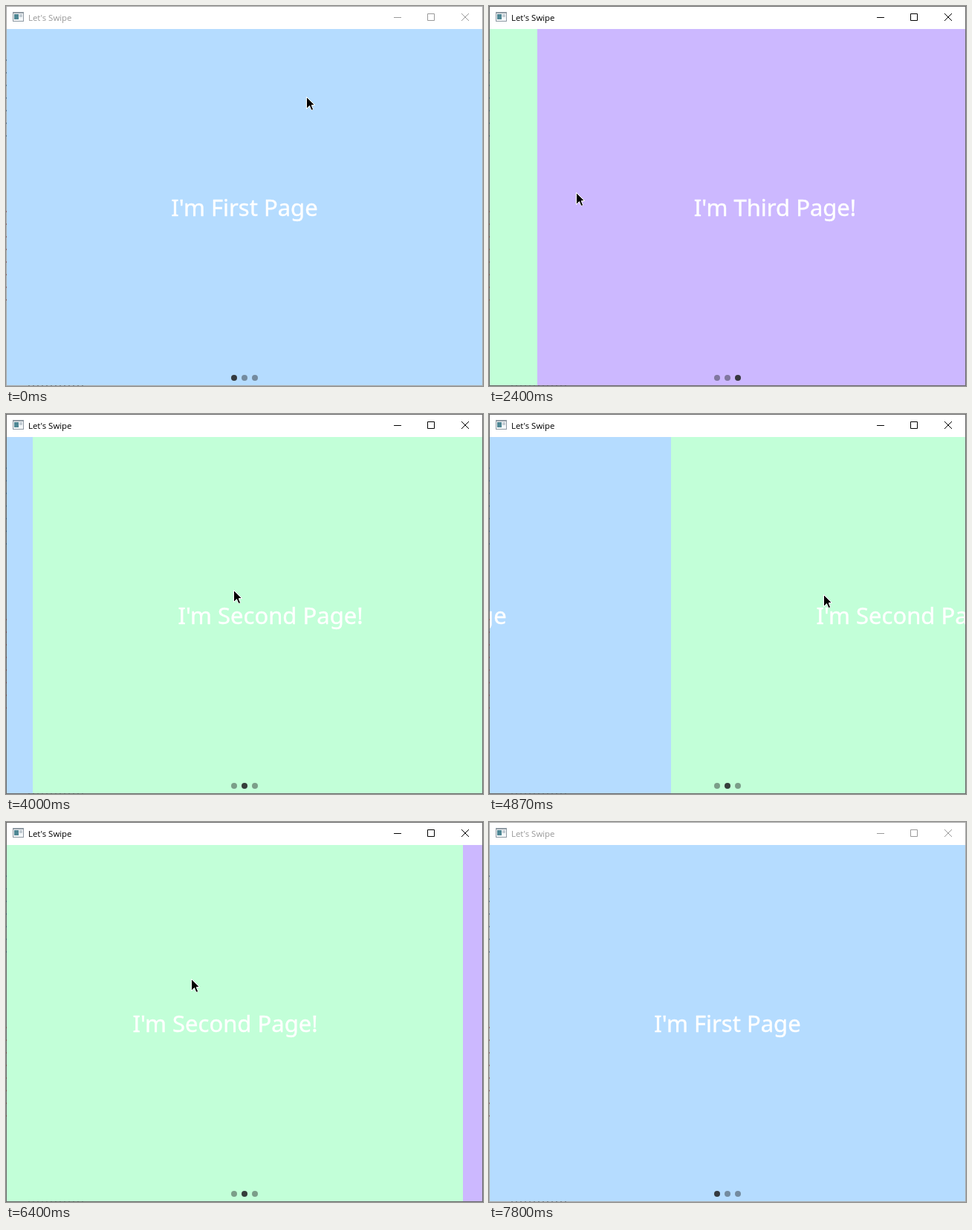
Write an HTML page with a canvas that moves like this. It is 642 px wide and 512 px high and loops after 7.94 s.

```html
<!DOCTYPE html>
<html lang="en">
<head>
<meta charset="utf-8">
<title>Let's Swipe</title>
<style>
html, body { margin: 0; width: 100%; height: 100%; overflow: hidden; background: #fff; }
canvas { display: block; }
</style>
</head>
<body>
<canvas id="stage" width="642" height="512"></canvas>
<script>
const ctx = document.getElementById('stage').getContext('2d');
const LOOP = 7940, TICK = 1000 / 15, PAGE = 640;
const ACTIVE_FROM = 12, ACTIVE_TO = 117;

const pages = [
  { text: "I'm First Page", color: '#b5dcff' },
  { text: "I'm Second Page!", color: '#c2ffd8' },
  { text: "I'm Third Page!", color: '#ccb8ff' },
];

// Ticks at which the swipes begin: two forward, two back, and again.
const swipeStarts = [12.63, 30.73, 48.5, 58.63, 69.05, 77, 90.23, 96.92];
const SWIPE_TICKS = 7;

// Pointer stops: arrival tick, x, y. It rests until the stroke to the next stop begins.
const stops = [
  [0, 404, 122], [2, 552, 201], [18, 33, 217], [23, 257, 229], [29, 463, 251],
  [36, 117, 251], [47, 138, 240], [54, 440, 236], [60, 306, 237], [65, 540, 236],
  [69, 600, 240], [73, 450, 243], [77, 610, 255], [84, 399, 265], [89, 191, 196],
  [96, 249, 211], [102, 570, 230], [108, 645, 300],
];
const STROKE_TICKS = 6;

const clamp01 = p => Math.min(1, Math.max(0, p));
const smooth = p => p * p * (3 - 2 * p);
const smoother = p => p * p * p * (10 - 15 * p + 6 * p * p);

function scrollAt(tick) {
  return Math.round(swipeStarts.reduce((scroll, start, i) => {
    const direction = i % 4 < 2 ? 1 : -1;
    return scroll + direction * PAGE * smoother(clamp01((tick - start) / SWIPE_TICKS));
  }, 0));
}

function pointerAt(tick) {
  const next = stops.findIndex(([arrival]) => arrival > tick);
  if (next < 0) return stops.at(-1).slice(1);
  const [leave, x0, y0] = stops[next - 1];
  const [arrival, x1, y1] = stops[next];
  const start = Math.max(leave, arrival - STROKE_TICKS);
  const p = smooth(clamp01((tick - start) / (arrival - start)));
  return [Math.round(x0 + (x1 - x0) * p), Math.round(y0 + (y1 - y0) * p)];
}

function box(color, x, y, w, h) {
  ctx.fillStyle = color;
  ctx.fillRect(x, y, w, h);
}

function label(text, x, y, font, color, align) {
  ctx.font = font;
  ctx.fillStyle = color;
  ctx.textAlign = align;
  ctx.fillText(text, x, y);
}

function drawTitleBar(active) {
  const ink = active ? '#000' : '#999';
  box('#fff', 0, 0, 642, 31);
  box('#8f9aa3', 9, 8, 15, 13);
  box('#f4f7f9', 10, 10, 13, 10);
  box('#4f8794', 11, 11, 6, 7);
  box('#c3ccd3', 18, 11, 4, 4);
  label("Let's Swipe", 30, 20, '11.4px "Open Sans", sans-serif', ink, 'left');

  ctx.strokeStyle = ink;
  ctx.lineWidth = 1;
  ctx.beginPath();
  ctx.moveTo(522, 15.5); ctx.lineTo(532, 15.5);
  ctx.rect(567.5, 10.5, 9, 9);
  ctx.moveTo(613, 10); ctx.lineTo(623, 20);
  ctx.moveTo(623, 10); ctx.lineTo(613, 20);
  ctx.stroke();
}

function drawPages(scroll) {
  ctx.save();
  ctx.beginPath();
  ctx.rect(1, 31, PAGE, 480);
  ctx.clip();
  ctx.strokeStyle = '#fff';
  ctx.lineWidth = 0.4;
  pages.forEach(({ text, color }, i) => {
    const left = 1 + i * PAGE - scroll;
    box(color, left, 31, PAGE, 480);
    label(text, left + 320, 283, '31px "Noto Sans", sans-serif', '#fff', 'center');
    ctx.strokeText(text, left + 320, 283);
  });
  const current = Math.round(scroll / PAGE);
  pages.forEach((_, i) => {
    ctx.fillStyle = `rgba(38,40,42,${i === current ? 0.9 : 0.45})`;
    ctx.beginPath();
    ctx.arc(307 + 14 * i, 501, 4, 0, 2 * Math.PI);
    ctx.fill();
  });
  ctx.restore();
}

function drawBorder(active) {
  ctx.strokeStyle = active ? '#6b6b6b' : '#a9a9a9';
  ctx.lineWidth = 1;
  ctx.strokeRect(0.5, 0.5, 641, 511);
  // Text lines of the window behind show through the edge.
  ctx.globalAlpha = 0.5;
  for (let y = 72; y < 400; y += 17) {
    if (y < 180 || y > 270) box(y > 270 ? '#7a2020' : '#1d3f60', 0, y, 1, 2);
  }
  for (let x = 30; x < 104; x += 6) box('#444', x, 511, 2, 1);
  ctx.globalAlpha = 1;
}

const arrow = new Path2D('M.5 .5V16.5L4.5 12.5L6.5 17.5L8 18.5L9.5 17L7.5 12.5V11.5H11.5Z');

function drawPointer(x, y) {
  ctx.save();
  ctx.translate(x, y);
  ctx.fillStyle = '#000';
  ctx.strokeStyle = '#fff';
  ctx.fill(arrow);
  ctx.stroke(arrow);
  ctx.restore();
}

function draw(elapsed) {
  const tick = Math.floor((elapsed % LOOP + 4) / TICK);
  const active = tick >= ACTIVE_FROM && tick < ACTIVE_TO;
  drawTitleBar(active);
  drawPages(scrollAt(tick));
  drawBorder(active);
  drawPointer(...pointerAt(tick));
}

let begin;
function frame(now) {
  begin ??= now;
  draw(now - begin);
  requestAnimationFrame(frame);
}
draw(0);
requestAnimationFrame(frame);
</script>
</body>
</html>
```
